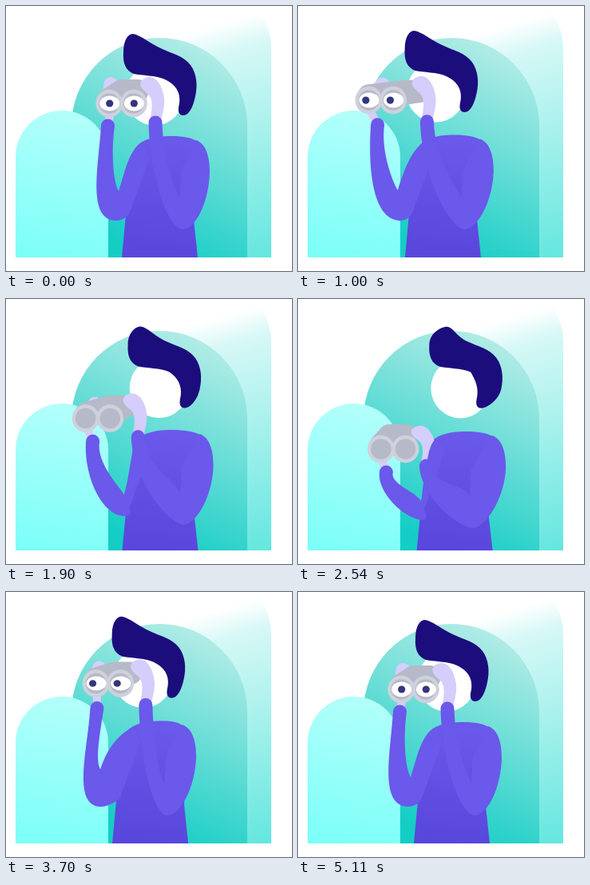
Recreate the animation shown at these times as an HTML page with a canvas. Size 358x332 px, loop 5550 ms.

```html
<!DOCTYPE html>
<html lang="en">
<head>
<meta charset="utf-8">
<title>Lookout</title>
<style>
html, body { margin: 0; width: 100%; height: 100%; overflow: hidden; background: #fff; }
canvas { display: block; width: 358px; height: 332px; }
</style>
</head>
<body>
<canvas id="stage" width="358" height="332"></canvas>
<script>
const ctx = document.getElementById('stage').getContext('2d');
const LOOP = 5550, FLOOR = 315;
const LILAC = '#d5cdfb', ARM = '#6a59ea', BARREL = '#b6b9c8', RING = '#ced1dc', HAIR = '#1c0d7d';

const clamp = v => Math.max(0, Math.min(1, v));

// Eased 0 to 1 between two times
function ramp(t, from, to) {
  const u = clamp((t - from) / (to - from));
  return u * u * (3 - 2 * u);
}

// Three controls drive the whole figure
function controlsAt(t) {
  const lookLeft = ramp(t, 20, 1000);
  return {
    lean: 0.92 * lookLeft - 1.22 * ramp(t, 1530, 2060) +
      1.3 * ramp(t, 2640, 3740) - ramp(t, 4440, 5110),
    lower: ramp(t, 1530, 2400) - ramp(t, 2970, 3740),
    reach: lookLeft - ramp(t, 1530, 2600)
  };
}

function eyeOpening(t, lower) {
  const blink = start => clamp(Math.abs(t - start - 85) / 85);
  return Math.min(blink(1200), blink(4035), 1 - clamp(lower * 8));
}

function gradient(x0, y0, x1, y1, ...colors) {
  const g = ctx.createLinearGradient(x0, y0, x1, y1);
  colors.forEach((c, i) => g.addColorStop(i / (colors.length - 1), c));
  return g;
}

function fill(path, color) {
  ctx.fillStyle = color;
  ctx.fill(new Path2D(path));
}

function line(path, width, color) {
  ctx.lineWidth = width;
  ctx.lineCap = ctx.lineJoin = 'round';
  ctx.strokeStyle = color;
  ctx.stroke(new Path2D(path));
}

function oval(x, y, rx, ry, color) {
  ctx.fillStyle = color;
  ctx.beginPath();
  ctx.ellipse(x, y, rx, ry, 0, 0, 7);
  ctx.fill();
}

function shifted(x, y, paint) {
  ctx.save();
  ctx.translate(x, y);
  paint();
  ctx.restore();
}

function arch(x0, x1, top, color) {
  const r = (x1 - x0) / 2;
  fill(`M${x0},${FLOOR}V${top + r}A${r},${r} 0 0 1 ${x1},${top + r}V${FLOOR}Z`, color);
}

function drawArches() {
  const haze = gradient(260, 25, 345, FLOOR, '#fff', '#62e6de');
  haze.addColorStop(0.12, '#d6f8f6');
  arch(186, 332, -20, haze);
  arch(82, 302, 40, gradient(260, 55, 145, 295, '#b4ece6', '#14cdc5'));
  arch(12, 128, 131, gradient(85, 131, 55, FLOOR, '#b3fffb', '#7dfff8'));
}

// The quiff slides right and the sideburn left as the head bows
function drawHead(bow) {
  const tip = 222 - bow, quiff = 159 + bow;
  oval(186, 112, 37, 37.5, '#fff');
  fill(`M147,58C147,42 ${quiff - 6},35 ${quiff},35C${quiff + 9},36 180,47 196,54
    C208,60 222,62 231,74C239,85 240,100 237,113C234,127 ${tip + 7},137 ${tip},137
    C${tip - 7},137 ${tip - 7},130 ${tip - 5},122C${tip - 3},108 ${tip - 10},98 199,92
    C188,87 170,87 160,85C150,81 146,72 147,58Z`, HAIR);
}

function drawTorso(dx, dy, side) {
  fill(`M${145 + dx},${FLOOR}L${152 + dx},${240 + dy}L${158 + dx},${188 + dy}
    C${162 + dx},${168 + dy} ${182 + dx},${163 + dy} ${208 + dx},${163 + dy}
    C${222 + dx},${163 + dy} ${side - 22},${165 + dy} ${side - 13},${171 + dy}
    L${235 + dx},${268 + dy}L${240 + dx},${FLOOR}Z`,
    gradient(205, 170, 190, FLOOR, ARM, '#5946dc'));
}

function drawBinoculars(x, y, bx, by, pupil, open) {
  const barrel = `M${x - 15},${y - 6}L${bx - 10},${by}H${bx + 10}L${x + 15},${y - 6}Z`;
  fill(barrel, BARREL);
  line(barrel, 28, BARREL);
  const lenses = [x - 15.3, x + 15.3];
  lenses.forEach(c => oval(c, y, 17, 17.3, RING));
  lenses.forEach(c => {
    oval(c, y, 12.8, 12.8, BARREL);
    if (open > 0.02) {
      oval(c + 0.5, y, 12.5, 9.5 * open, '#fff');
      oval(c + pupil, y, 4.6, 4.6 * open, '#34357f');
    }
  });
}

function drawRightHand(height) {
  ctx.scale(1, height);
  fill(`M-7,0C-6,-10 -3,-18 -5,-28C-7,-37 -15,-38 -18,-45C-21,-52 -14,-57 -7,-57
    C3,-57 10,-42 11,-30C12,-18 8,-10 7,0Z`, LILAC);
}

function drawLeftArm(hx, hy, ex, ey, vx, vy, dx, dy, bend) {
  const sx = 172 + dx, sy = 170 + dy;
  fill(`M${hx - 8.5},${hy}C${hx - 11.5},${hy + 0.42 * (ey - hy)} ${ex - bend},${ey - 2} ${ex},${ey}
    Q${ex + 10},${ey} ${154 + dx},${261 + dy}L${sx + 8},${sy + 20}L${sx},${sy}
    C${sx - 18},${sy + 9} ${vx + 9},${vy - 28} ${vx},${vy}
    C${vx - 7},${vy - 12} ${hx + 4},${hy + 0.4 * (vy - hy)} ${hx + 8.5},${hy}
    A8.5,8.5 0 0 0 ${hx - 8.5},${hy}Z`, ARM);
}

function drawRightArm(side, dy, ex, ey, hx, hy) {
  const drop = ey - hy;
  fill(`M${side - 17},${168 + dy}C${side - 4},${173 + dy} ${side},${190 + dy} ${side},${208 + dy}
    C${side - 1},${245 + dy} ${ex + 17},${ey - 1} ${ex},${ey}
    C${ex - 18},${ey - 1} ${hx - 7},${hy + drop / 2} ${hx - 8.5},${hy}
    A8.5,8.5 0 0 1 ${hx + 8.5},${hy}
    C${hx + 10},${hy + drop * 0.35} ${ex - 12},${ey - 58} ${ex - 4},${ey - 40}
    L${ex - 2},${ey - 74}Z`, ARM);
}

function draw(t) {
  const { lean, lower, reach } = controlsAt(t);

  // Body
  const dx = -12 * lean, dy = 2.5 * lower - 1.5 * lean;
  const side = 255 - 17 * lean + 5.5 * reach;

  // Binoculars, with the hands following them
  const x = 144.5 - 16.5 * lean - 30 * lower - 25.5 * reach;
  const y = 122 - 8 * lean + 63.5 * lower + 3.4 * reach;
  const rightX = x + 42.5 + 4.5 * lean + 11 * reach;
  const rightY = y + 24 + 3 * lean - 2 * lower;
  const leftX = x - 17 + 3 * lean + 10 * reach + 9 * lower;
  const leftY = y + 28 + 3 * lean + 2 * lower;

  ctx.clearRect(0, 0, 358, 332);
  drawArches();
  shifted(13 * lower - 14.5 * lean, -4.3 * lean - 1.5 * lower, () => drawHead(10 * lower));
  drawTorso(dx, dy, side);
  line(`M${x - 15},${y}l${2 + 2 * lean + 13 * reach},${-24 + 5 * lean + 16 * lower}`, 18, LILAC);
  line(`M${leftX},${leftY}L${x - 14},${y + 12}`, 10, LILAC);
  drawBinoculars(x, y, x + 10.5 + 8 * lean + 21 * reach - 3 * lower, y - 16 + 3 * lean + 2 * reach,
    0.5 - 4.5 * lean, eyeOpening(t, lower));
  shifted(rightX, rightY, () => drawRightHand(1 - 0.12 * lower));
  drawLeftArm(leftX, leftY, 137 - 19 * lean + 8 * reach + 12 * lower, 269 + 8 * lower,
    141 - 23 * lean + 5 * reach + 6 * lower, 232 - 10 * lean + 8 * reach + 18 * lower,
    dx, dy, 36 - 14 * lower);
  drawRightArm(side, dy, 221 - 19 * lean + 5 * reach - 8 * lower, 280 + 7 * lower, rightX, rightY);
}

const start = performance.now();
function tick() {
  draw((performance.now() - start) % LOOP);
  requestAnimationFrame(tick);
}
tick();
</script>
</body>
</html>
```
